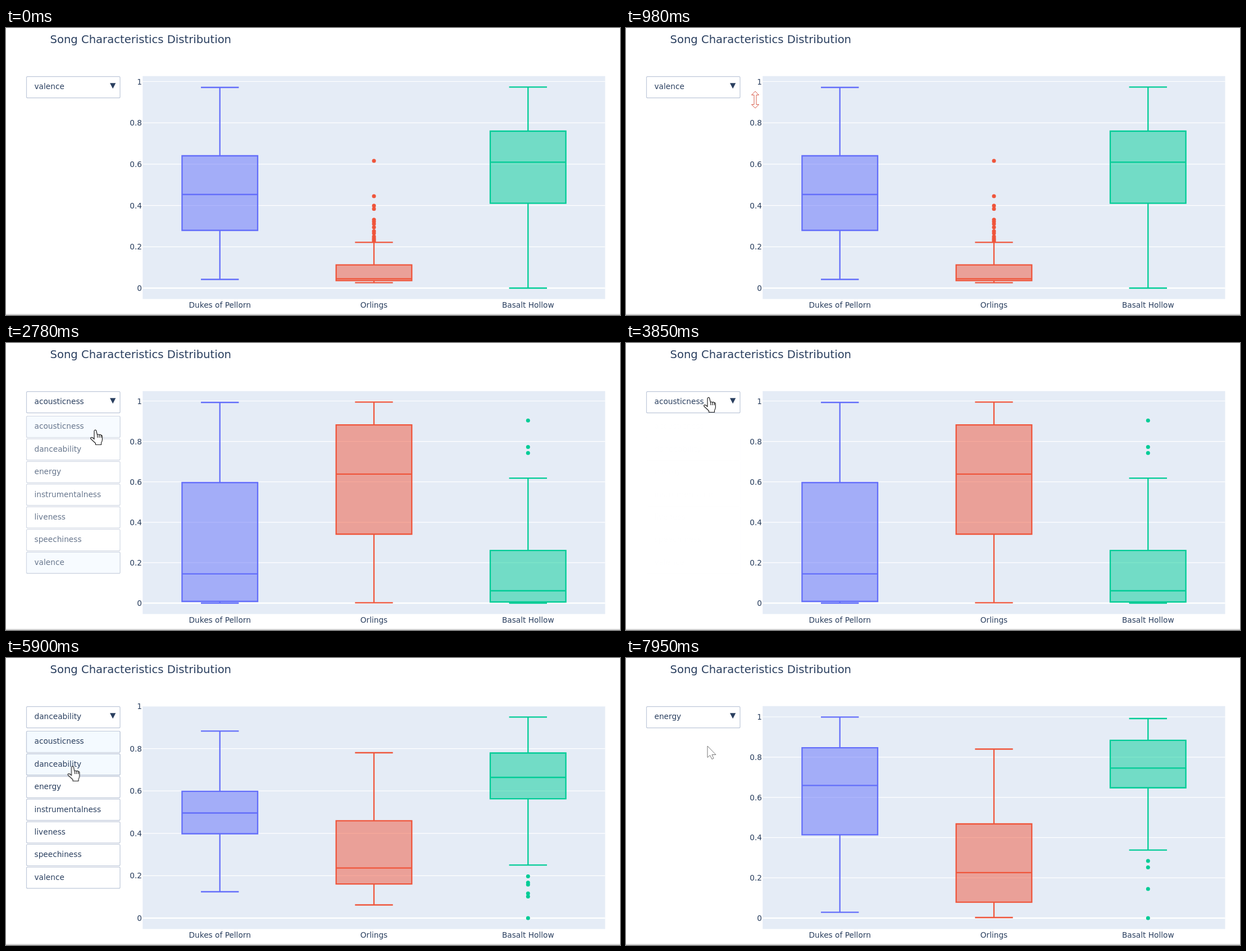
Write an HTML page that moves like this. It is 1093 px wide and 512 px high and loops after 8 s.

```html
<!DOCTYPE html>
<html lang="en">
<head>
<meta charset="utf-8">
<title>Song Characteristics Distribution</title>
<style>
html, body { margin: 0; width: 100%; height: 100%; overflow: hidden; background: #fff; }
svg { display: block; width: 100%; height: 100%; font: 13.7px "DejaVu Sans", sans-serif; }
text { fill: #2a3f5f; }
.title { font-size: 19.6px; }
.button { fill: #fff; stroke: #bec8d9; stroke-width: 1.2; }
.tint { fill: #f4faff; stroke: #bec8d9; stroke-width: 1.2; opacity: 0; }
.grid { stroke: #fff; stroke-width: 1.2; }
.zero { stroke-width: 2.3; }
.box { stroke-width: 2.3; fill-opacity: .5; }
.hover text { font: 14.8px "Liberation Sans", Arial, sans-serif; }

/* Hard switches */
.chart, .hover, .tint, .shape { opacity: 0; animation: 8s step-end infinite; }
.valence { animation-name: valence; }
.acousticness { animation-name: acousticness; }
.danceability { animation-name: danceability; }
.energy { animation-name: energy; }
@keyframes valence { 0% { opacity: 1 } 33.125%, 100% { opacity: 0 } }
@keyframes acousticness { 0% { opacity: 0 } 33.125% { opacity: 1 } 72.125%, 100% { opacity: 0 } }
@keyframes danceability { 0% { opacity: 0 } 72.125% { opacity: 1 } 96.875%, 100% { opacity: 0 } }
@keyframes energy { 0% { opacity: 0 } 96.875%, 100% { opacity: 1 } }

.hover-right { animation-name: hover-right; }
.hover-left { animation-name: hover-left; }
@keyframes hover-right { 0% { opacity: 0 } 7.25% { opacity: 1 } 10.625%, 100% { opacity: 0 } }
@keyframes hover-left { 0% { opacity: 0 } 6.375% { opacity: 1 } 7.25%, 100% { opacity: 0 } }

.tint0 { animation-name: tint0; }
.tint1 { animation-name: tint1; }
.tint2 { animation-name: tint2; }
.tint6 { animation-name: tint6; }
@keyframes tint0 { 0% { opacity: 0 } 23% { opacity: 1 } 90.5%, 100% { opacity: 0 } }
@keyframes tint1 { 0% { opacity: 0 } 56.5%, 100% { opacity: 1 } }
@keyframes tint2 { 0% { opacity: 0 } 93.5%, 100% { opacity: 1 } }
@keyframes tint6 { 0% { opacity: 1 } 40%, 100% { opacity: 0 } }

.menu { opacity: 0; animation: menu 8s linear infinite; }
@keyframes menu {
  0%, 18% { opacity: 0 } 20%, 33.75% { opacity: 1 }
  37.25%, 48.125% { opacity: 0 } 50.25%, 74.6% { opacity: 1 }
  77.5%, 86% { opacity: 0 } 88.1%, 97.25% { opacity: 1 }
  99.25%, 100% { opacity: 0 }
}

/* Pointer: path of the hotspot and its changing shape */
.pointer { animation: move 8s linear infinite; stroke-linejoin: round; }
@keyframes move {
  0% { transform: translate(1080px, 262px); animation-timing-function: step-end }
  6.375% { transform: translate(940px, 215px); animation-timing-function: step-end }
  7.25%, 9.7% { transform: translate(410px, 168px) }
  10.625% { transform: translate(345px, 154px) }
  12.25%, 12.95% { transform: translate(230px, 128px) }
  13% { transform: translate(192px, 118px) }
  14.75%, 20% { transform: translate(150px, 98px) }
  25.5%, 37.5% { transform: translate(158px, 155px) }
  40.625%, 52.5% { transform: translate(146px, 97px) }
  58%, 77.5% { transform: translate(117.5px, 193px) }
  80.875%, 83.375% { transform: translate(146px, 97px) }
  84.25%, 86.875% { transform: translate(151px, 94px) }
  88.625%, 89.5% { transform: translate(145px, 155px) }
  95.25%, 97.75% { transform: translate(145px, 228px) }
  99.375%, 100% { transform: translate(145px, 157px) }
}
.arrow { animation-name: arrow; }
.cross { animation-name: cross; }
.resize { animation-name: resize; }
.hand { animation-name: hand; }
@keyframes arrow {
  0% { opacity: 0 } 5.5% { opacity: 1 } 6.375% { opacity: 0 }
  37.25% { opacity: 1 } 39.1% { opacity: 0 }
  77.5% { opacity: 1 } 79.1% { opacity: 0 } 98.75%, 100% { opacity: 1 }
}
@keyframes cross { 0% { opacity: 0 } 6.375% { opacity: 1 } 12.2%, 100% { opacity: 0 } }
@keyframes resize { 0% { opacity: 0 } 12.2% { opacity: 1 } 13%, 100% { opacity: 0 } }
@keyframes hand {
  0% { opacity: 0 } 13% { opacity: 1 } 37.25% { opacity: 0 }
  39.1% { opacity: 1 } 77.5% { opacity: 0 } 79.1% { opacity: 1 } 98.75%, 100% { opacity: 0 }
}
</style>
</head>
<body>
<svg id="stage" viewBox="0 0 1093 512" preserveAspectRatio="none"></svg>
<script>
const ZERO = 464;
const series = [
  { name: "Dukes of Pellorn", x: 380.7, color: "#636efa" },
  { name: "Orlings", x: 655, color: "#ef553b" },
  { name: "Basalt Hollow", x: 929.3, color: "#00cc96" },
];
const features = ["acousticness", "danceability", "energy", "instrumentalness",
  "liveness", "speechiness", "valence"];

// unit: pixels per 1.0; boxes: y of max, q3, median, q1, min; dots: [series, y...]
const charts = {
  valence: {
    unit: 368.5,
    boxes: [[106, 228, 297, 361, 448.5], [382.3, 422.7, 447.3, 450.7, 454.4], [105.4, 184, 239.3, 312.7, 464]],
    dots: [1, 237, 300, 317, 322.7, 342, 345.5, 349.5, 355.5, 362.5, 366, 372, 375, 377.5, 380],
  },
  acousticness: {
    unit: 360.5,
    boxes: [[106, 249, 411.8, 461, 464], [105.4, 146.2, 233.8, 341, 463.3], [241.2, 370.2, 442, 462, 464]],
    dots: [2, 138.3, 185.5, 196.2],
  },
  danceability: {
    unit: 378,
    boxes: [[130.4, 237.8, 276.5, 313.5, 417], [169, 290.4, 374.6, 403.2, 440.5], [105.4, 169.5, 213, 251.2, 369.4]],
    dots: [2, 389.6, 400.8, 404.2, 420, 425.6, 464],
  },
  energy: {
    unit: 359,
    boxes: [[105.4, 160.2, 227.3, 315.3, 453.6], [162.5, 296, 382.8, 435.6, 463], [108, 146.8, 196.4, 231.5, 342.6]],
    dots: [2, 362, 373.5, 412, 464],
  },
};

const text = (x, y, content, attrs = "") => `<text x="${x}" y="${y}" ${attrs}>${content}</text>`;
const button = (y, cls = "button") => `<rect class="${cls}" x="36.5" y="${y}" width="166.5" height="38" rx="2"/>`;

function boxPlot({ x, color }, [max, q3, median, q1, min]) {
  const half = 67.3, cap = 33.7;
  return `<path class="box" stroke="${color}" fill="${color}" d="M${x - half} ${q3}h${2 * half}V${q1}h${-2 * half}Z
    M${x - half} ${median}h${2 * half}M${x} ${q3}V${max}M${x} ${q1}V${min}
    M${x - cap} ${max}h${2 * cap}M${x - cap} ${min}h${2 * cap}"/>`;
}

function chart([feature, { unit, boxes, dots: [owner, ...dots] }]) {
  const ticks = [0, .2, .4, .6, .8, 1].map(v => {
    const y = ZERO - v * unit;
    return `<path class="grid ${v ? "" : "zero"}" d="M243.3 ${y}H1066.5"/>` +
      text(242, y + 5, v, 'text-anchor="end"');
  });
  const { x, color } = series[owner];
  return `<g class="chart ${feature}">${ticks.join("")}
    ${boxes.map((box, i) => boxPlot(series[i], box)).join("")}
    ${dots.map(y => `<circle cx="${x}" cy="${y}" r="3.5" fill="${color}"/>`).join("")}
    ${text(50.5, 108.7, feature)}</g>`;
}

const menuRow = (label, i) => {
  const y = 130.5 + 40.4 * i;
  return button(y) + button(y, `tint tint${i}`) + text(50.5, y + 22.8, label);
};

const pointer = `<g class="pointer">
  <path class="shape arrow" fill="#fff" stroke="#777" d="M0 0V20.5L4.6 16.5L8 23.5L11 22L8 15.5H15Z"/>
  <path class="shape cross" stroke="#444" d="M-13 0H13M0 -13V13"/>
  <path class="shape resize" fill="#fff" stroke="#d9604f" d="M0 -15L6.5 -8.5H2V8.5H6.5L0 15L-6.5 8.5H-2V-8.5H-6.5Z"/>
  <path class="shape hand" fill="#fff" stroke="#222" stroke-width="1.2" d="M-1 2Q0 -1 2.5 1L4.5 9Q6 7 8 9Q10 7.5 11.3 9.5
    Q13 9 13.4 12V18Q13 21 11.5 23V26.5H1.5V24L-6 17Q-8.5 14.5 -6.5 13.5Q-4 13 -1 16.5ZM4.5 9L5 14M8 9V14M11.3 9.5V14"/>
</g>`;

const stage = document.getElementById("stage");
stage.innerHTML = `
  <path fill="#fff" d="M0 0H1093V512H0Z"/>
  <path fill="#e5ecf6" d="M243.3 85.7H1066.5V483.5H243.3Z"/>
  <path stroke="#c8c8c8" stroke-width="1.6" d="M0 511H1093"/>
  ${text(78.5, 27, "Song Characteristics Distribution", 'class="title"')}
  ${series.map(s => text(s.x, 499, s.name, 'text-anchor="middle"')).join("")}
  ${button(86.7)}
  <path fill="#2a3f5f" d="M185 98.3H195.3L190.2 108.3Z"/>
  ${Object.entries(charts).map(chart).join("")}
  <g id="hovers"></g>
  <g class="menu">${features.map(menuRow).join("")}</g>
  ${pointer}`;

// Flags beside a box, sized to their text; side is 1 for right, -1 for left
function addHover({ name, x, color }, ys, side, ink) {
  const group = document.createElementNS(stage.namespaceURI, "g");
  group.setAttribute("class", `hover ${side > 0 ? "hover-right" : "hover-left"}`);
  document.getElementById("hovers").append(group);
  const edge = x + side * 67.3;
  const anchor = `text-anchor="${side > 0 ? "start" : "end"}"`;
  const parts = ["max", "q3", "median", "q1", "min"];
  ys.forEach((y, i) => {
    const value = +((ZERO - y) / charts.valence.unit).toFixed(3);
    const flag = document.createElementNS(stage.namespaceURI, "g");
    group.append(flag);
    flag.innerHTML = text(edge + side * 10, y + 5, `(${name}, ${parts[i]}: ${value})`, `${anchor} style="fill:${ink}"`);
    const width = flag.firstChild.getComputedTextLength() + 7;
    const shape = `<path fill="${color}" stroke="${ink}" d="M${edge} ${y}l${side * 6.8} -6.8v-5.7h${side * width}v25h${-side * width}v-5.7Z"/>`;
    const label = text(edge + side * (width + 10), y + 5, name, `${anchor} style="fill:${color}"`);
    flag.innerHTML = shape + flag.innerHTML + label;
  });
}
addHover(series[0], charts.valence.boxes[0], 1, "#fff");
addHover(series[2], charts.valence.boxes[2], -1, "#444");
</script>
</body>
</html>
```
